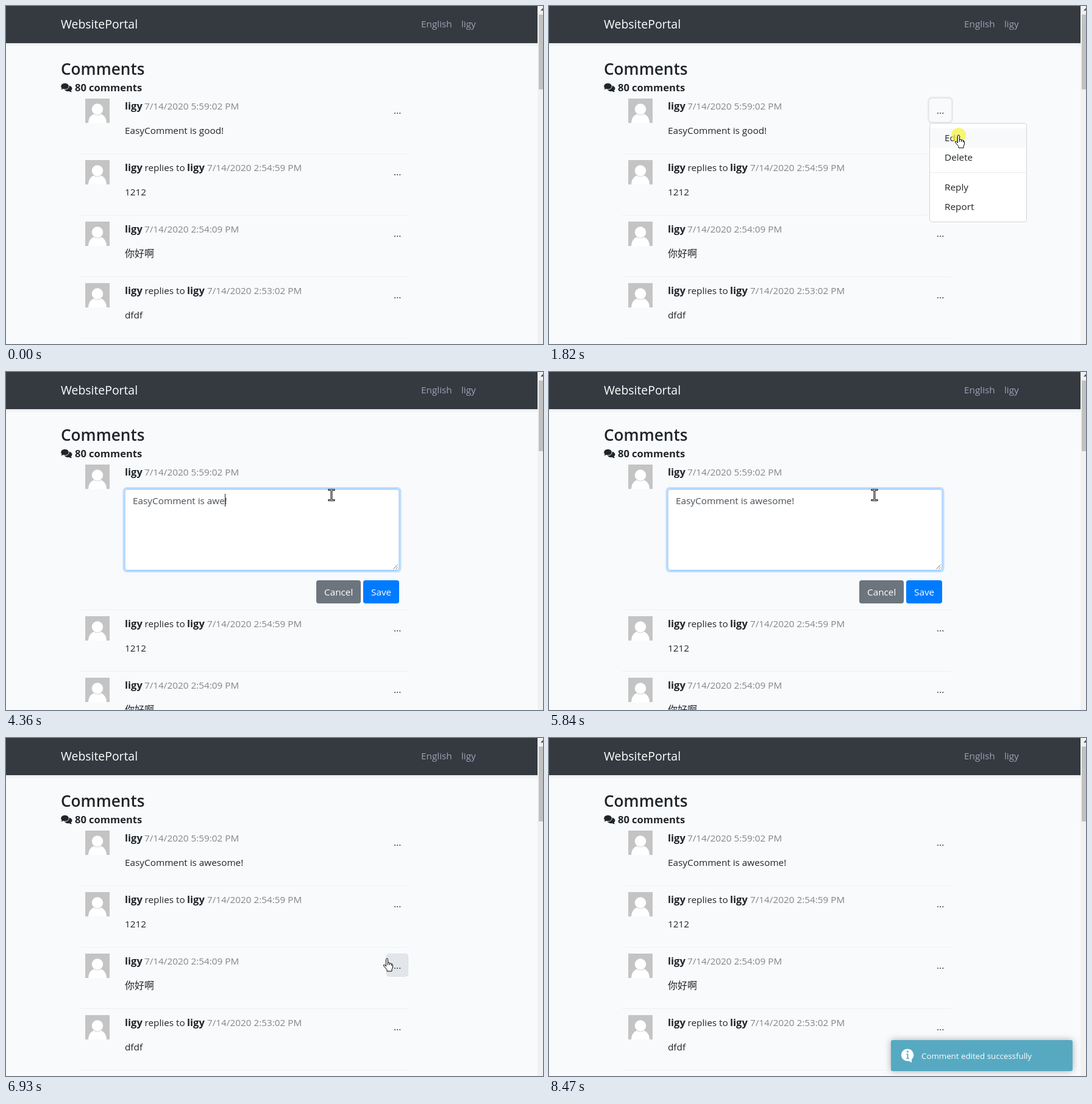
Write an HTML page that moves like this. It is 881 px wide and 555 px high and loops after 9020 ms.

```html
<!DOCTYPE html>
<html lang="en">
<head>
<meta charset="utf-8">
<title>Comments</title>
<style>
  html, body { margin: 0; width: 100%; height: 100%; overflow: hidden; background: #f8fafc; }
  svg { position: absolute; left: 0; top: 0; }
  text, #toast { font: 15.3px "Open Sans", "Noto Sans CJK SC", sans-serif; fill: #212529; }
  text.bold { font-size: 16.5px; font-weight: 700; }
  text.cjk { font: 16px "Noto Sans CJK SC", sans-serif; }
  text.date { fill: #868686; }
  text.link { fill: #a59fb8; }
  text.light { fill: #fff; }
  #toast {
    position: absolute; left: 561px; top: 496px; width: 298px; height: 51px;
    border-radius: 3px; background: #2f96b4;
  }
  #toast text { font-size: 13.3px; fill: #fff; }
</style>
</head>
<body>
<svg id="page" width="881" height="555"></svg>
<div id="toast">
  <svg width="298" height="51">
    <path d="M27 14.5a10 10 0 0 1 7 17.3V37l-5-2.7A10 10 0 1 1 27 14.5Z" fill="#fff"/>
    <path d="M25 22.5h3.4v7h1.6v1.2h-5v-1.2h1.6v-5.8H25Z" fill="#2f96b4"/>
    <circle cx="27.3" cy="19" r="1.6" fill="#2f96b4"/>
    <text x="50" y="31">Comment edited successfully</text>
  </svg>
</div>
<svg id="pointer" width="881" height="555">
  <circle id="glow" r="12" fill="#f6f43c" opacity=".7"/>
  <g id="cursor" stroke-linejoin="round">
    <path id="arrow" d="M0 0V16.5L4 13 6.5 18.5 8.8 17.5 6.5 12H11.5Z" fill="#fff" stroke="#000"/>
    <path id="hand" fill="#fff" stroke="#000" d="M-1.5 13V1.5Q-1.5 0 0 0T1.5 1.5V7H3Q4 7 4.5 8H6Q7 8 7.5 9 9.5 9 9.5 11V15L8 18V21H0V18.5L-5.5 12Q-6 10-4 10.2L-1.5 13M1.5 7v4M4.5 8v3M7.5 9v3"/>
    <g id="beam" fill="none">
      <path d="M-5.5-8.5H5.5M-5.5 8.5H5.5M0-8.5V8.5" stroke="#000" stroke-width="3"/>
      <path d="M-4.5-8.5H4.5M-4.5 8.5H4.5M0-8.5V8.5" stroke="#fff"/>
    </g>
  </g>
</svg>
<script>
const LOOP = 9020, USER = 'ligy', PREFIX = 'EasyComment is ';
const FORM_OPEN = 1950, FORM_CLOSE = 6930, MENU_OPEN = 1160;
const $ = id => document.getElementById(id);
const show = (id, on) => { $(id).style.display = on ? '' : 'none'; };
const within = (t, a, b) => t >= a && t < b;

const text = (x, y, str, cls = '', extra = '') =>
  `<text x="${x}" y="${y}" class="${cls}" ${extra}>${str}</text>`;
const rect = (x, y, w, h, fill, extra = '') =>
  `<rect x="${x}" y="${y}" width="${w}" height="${h}" fill="${fill}" ${extra}/>`;

const avatar = y => `<g transform="translate(130 ${y})">${rect(0, 0, 40, 40, '#c4c4c4')}
  <path d="M5 40C5.5 30 11 24.5 20 24.5S34.5 30 35 40Z" fill="#fff"/>
  <circle cx="20" cy="17.5" r="9.8" fill="#c4c4c4"/><circle cx="20" cy="17.5" r="9.2" fill="#fff"/></g>`;
const heading = (y, date, isReply) => avatar(y) + text(195, y + 18, USER, 'bold') + (isReply
  ? text(227.5, y + 18, 'replies to') + text(297, y + 18, USER, 'bold') + text(330, y + 18, date, 'date')
  : text(227, y + 18, date, 'date'));
const moreButton = (i, y) => rect(624.5, y + .5, 35, 37, '#e2e6ea',
  `id="hover${i}" rx="4" stroke="#dae0e5"`) + text(636, y + 25, '...');
const rule = y => rect(120, y, 540, 1, '#eef0f2');

const others = [
  ['7/14/2020 2:54:59 PM', true, '1212'],
  ['7/14/2020 2:54:09 PM', false, '你好啊', 'cjk'],
  ['7/14/2020 2:53:02 PM', true, 'dfdf'],
].map(([date, isReply, body, cls], i) => {
  const y = 253 + 101 * i;
  return rule(y - 11) + heading(y, date, isReply) + text(195, y + 58, body, cls) + moreButton(i + 1, y);
}).join('') + rule(545);

const form = `<g id="form">
  ${rect(193, 190.5, 454, 137, 'none', 'rx="5" stroke="#bfdefd" stroke-width="3"')}
  ${rect(195, 192.5, 450, 133, '#fff', 'rx="4" stroke="#80bdff"')}
  <path d="M635.5 323.5l7-7M639.5 323.5l3-3" stroke="#777"/>
  ${rect(0, 200, 0, 21, '#0078d7', 'id="selection"')}
  ${text(208, 217, '', '', 'id="value" style="fill:#495057"')}
  ${rect(0, 200, 1, 21, '#222', 'id="caret"')}
  ${rect(509, 342, 73, 38, '#6c757d', 'rx="4"')}${text(522, 367, 'Cancel', 'light')}
  ${rect(586, 342, 59, 38, '#007bff', 'rx="4" id="save"')}${text(599, 367, 'Save', 'light')}
</g>`;

const menu = `<g id="menu">
  ${rect(624.5, 192.5, 159, 162, '#fff', 'rx="4" stroke="#d2d3d5"')}
  ${rect(625, 201, 158, 32, '#f8f9fa', 'id="editRow"')}
  ${text(649, 222, 'Edit')}${text(649, 254, 'Delete')}
  ${rect(625, 273, 158, 1, '#e9ecef')}
  ${text(649, 303, 'Reply')}${text(649, 335, 'Report')}
</g>`;

$('page').innerHTML = `
  <linearGradient id="shade" x2="0" y2="1"><stop stop-opacity=".06"/><stop offset="1" stop-opacity="0"/></linearGradient>
  ${rect(0, 0, 881, 555, '#f8fafc')}${rect(0, 61, 872, 6, 'url(#shade)')}${rect(0, 0, 872, 61, '#343a40')}
  ${text(90, 37, 'WebsitePortal', 'light', 'style="font-size:19.4px"')}
  ${text(681, 35, 'English', 'link')}${text(747, 35, USER, 'link')}
  ${text(90, 113, 'Comments', '', 'style="font-size:26.2px;font-weight:600"')}
  <g fill="#212529">
    <path d="M102 130.5c8 1 7.500 7 4.500 8.200l1.500 2.600q-3 0-4.300-1.300c-4 .6-6.700-.8-7.700-2.500Z"/>
    <path d="M96.500 126.500c9 0 9 10.500 0 10.500q-1.500 0-2.800-.5-1.500 1.300-4 1.300l1.500-2.600c-3.200-3-.7-8.700 5.300-8.700Z" stroke="#f8fafc"/>
  </g>
  ${text(113, 140, '80 comments', 'bold')}
  ${heading(152, '7/14/2020 5:59:02 PM')}
  <g id="first">
    ${text(195, 210, '', '', 'id="body"')}
    ${rect(622.5, 150.5, 39, 41, 'none', 'id="ring" rx="6" stroke="#e8e9eb" stroke-width="3"')}
    ${moreButton(0, 152)}
  </g>
  ${form}<g id="others">${others}</g>${menu}
  ${rect(872, 0, 9, 555, '#f1f1f1')}<path d="M877 7.500l3.500-4 3.500 4Z" fill="#505050"/>
  ${rect(874, 14, 7, 123, '#c1c1c1', 'id="thumb"')}`;

// start, end, steps, from, to, linear, downward bow
const moves = [
  [140, 860, 10, [692, 402], [647, 172]],
  [1410, 1640, 4, [647, 172], [672, 212]],
  [2190, 2340, 3, [672, 212], [534, 202], true],
  [6070, 6550, 7, [534, 202], [625, 362]],
  [7470, 7770, 5, [625, 362], [720, 359], false, 16],
  [8090, 8470, 6, [720, 359], [742, 575]],
];
const clicks = [[1110, 1160], [1790, 1950], [6710, 6850]];

// time, text after the prefix, caret index, selected
const edits = [
  [0, 'good!', 5], [3120, 'good!', 4], [3430, 'good!', 4, true],
  [3880, 'a!', 1], [4130, 'aw!', 2], [4360, 'awe!', 3], [4990, 'awes!', 4],
  [5060, 'aweso!', 5], [5220, 'awesom!', 6], [5320, 'awesome!', 7],
];
const caretOff = [[2490, 2970], [3430, 3880], [4910, 4990], [5840, 6340]];
const at = (table, t) => table.findLast(row => row[0] <= t);

function cursorAt(t) {
  const [start, end, steps, from, to, linear, bow = 0] = at(moves, t) || moves[0];
  const k = Math.min(steps - 1, Math.floor((t - start) / (end - start) * (steps - 1) + 1e-6));
  const p = Math.max(0, (k + 1) / steps), e = linear ? p : p * p * (3 - 2 * p);
  return [from[0] + (to[0] - from[0]) * e,
          from[1] + (to[1] - from[1]) * e + bow * Math.sin(Math.PI * e)];
}

function drawForm(t) {
  const [, word, index, selected] = at(edits, t);
  const value = $('value');
  value.innerHTML = PREFIX + (selected
    ? `<tspan style="fill:#fff">${word.slice(0, index)}</tspan>${word.slice(index)}` : word);
  const offset = n => 208 + value.getSubStringLength(0, n);
  const left = offset(PREFIX.length), right = offset(PREFIX.length + index);
  $('selection').setAttribute('x', left);
  $('selection').setAttribute('width', selected ? right - left : 0);
  $('caret').setAttribute('x', Math.round(right));
  show('caret', !caretOff.some(([a, b]) => within(t, a, b)));
  $('save').setAttribute('fill', t >= 6630 ? '#0069d9' : '#007bff');
}

function draw(t) {
  const editing = within(t, FORM_OPEN, FORM_CLOSE);
  const menuOpen = within(t, MENU_OPEN, FORM_OPEN);
  const visible = within(t, 140, 8470);
  const [x, y] = cursorAt(t);
  const over = (l, top, r, b) => visible && x >= l && x < r && y >= top && y < b;

  show('first', !editing);
  show('form', editing);
  show('menu', menuOpen);
  show('ring', within(t, 1410, FORM_OPEN));
  $('others').setAttribute('transform', `translate(0 ${editing ? 148 : 0})`);
  $('thumb').setAttribute('height', editing ? 116 : 123);
  $('body').textContent = PREFIX + (t < FORM_CLOSE ? 'good!' : 'awesome!');
  if (editing) drawForm(t);

  let onButton = false;
  for (let i = 0; i < 4; i++) {
    const top = 152 + 101 * i;
    const hover = !editing && over(624, top, 660, top + 38) && !(menuOpen && y > 192);
    show('hover' + i, hover);
    onButton ||= hover;
  }
  const onEdit = menuOpen && over(624, 200, 784, 233);
  show('editRow', onEdit);

  const onHand = onButton || onEdit || (editing && over(509, 342, 645, 380));
  const onText = editing && over(195, 192, 646, 326);
  show('hand', onHand);
  show('beam', onText);
  show('arrow', !onHand && !onText);
  show('cursor', visible);
  $('cursor').setAttribute('transform', `translate(${Math.round(x)} ${Math.round(y)})`);
  $('glow').setAttribute('cx', x);
  $('glow').setAttribute('cy', y);
  show('glow', clicks.some(([a, b]) => within(t, a, b)));

  const toast = $('toast').style, onToast = over(561, 496, 859, 547);
  const fade = t < 7010 ? 0 : Math.min(4, 1 + Math.floor((t - 7010) / 76.6)) * .2;
  toast.opacity = onToast ? 1 : fade;
  toast.boxShadow = `0 0 12px ${onToast ? '#000' : '#999'}`;
}

const begin = performance.now();
function tick() {
  draw((performance.now() - begin) % LOOP);
  requestAnimationFrame(tick);
}
tick();
</script>
</body>
</html>
```
